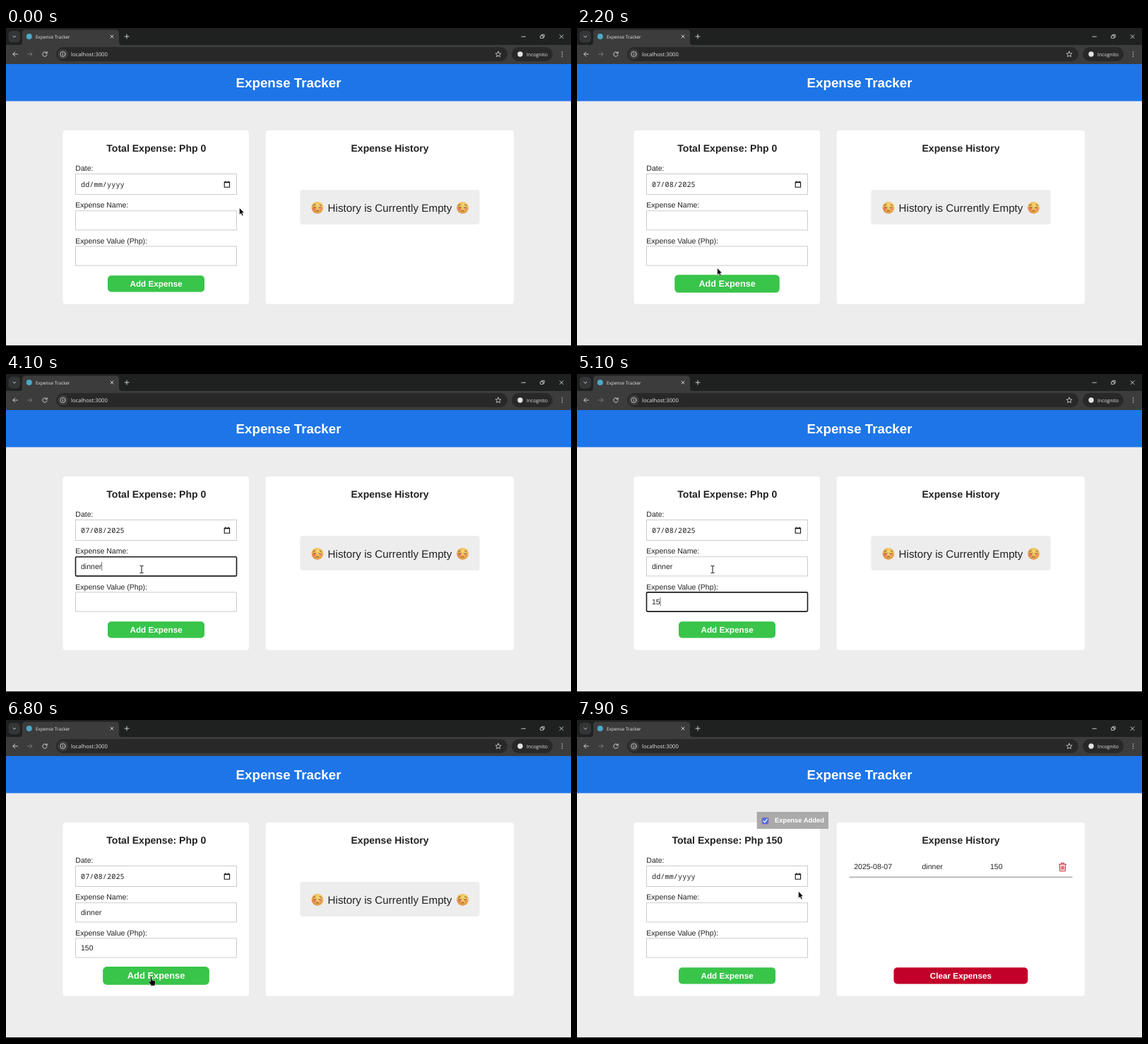
These frames come from a looping animation (800x450 px, 8000 ms). An HTML page:

```html
<!DOCTYPE html>
<html lang="en">
<head>
<meta charset="utf-8">
<title>Expense Tracker</title>
<style>
  html, body { margin: 0; width: 100%; height: 100%; overflow: hidden; background: #ededed; }
  svg { display: block; width: 800px; height: 450px; }
  text { font-family: "Liberation Sans", Arial, sans-serif; fill: #222; text-rendering: geometricPrecision; white-space: pre; }
  .mid { text-anchor: middle; }
  .bold { font-weight: 700; }
  .ui { font-family: "Open Sans", "Noto Sans", sans-serif; fill: #e6e6e6; }
  .mono { font-family: "Noto Sans Mono", monospace; letter-spacing: .1px; }
  .line { fill: none; stroke: #dedede; stroke-linecap: round; stroke-linejoin: round; }
  .white { fill: #fff; }
</style>
</head>
<body>
<svg id="stage" viewBox="0 0 800 450" xmlns="http://www.w3.org/2000/svg"></svg>
<script>
const LOOP = 8000, TICK = 100;

const rect = (x, y, w, h, fill, r = 0, more = '') =>
  `<rect x="${x}" y="${y}" width="${w}" height="${h}" rx="${r}" fill="${fill}" ${more}/>`;
const text = (x, y, size, str, cls = '', more = '') =>
  `<text x="${x}" y="${y}" font-size="${size}" class="${cls}" ${more}>${str}</text>`;
const line = (d, w = .9, more = '') => `<path class="line" d="${d}" stroke-width="${w}" ${more}/>`;
const group = (id, body) => `<g id="${id}">${body}</g>`;
const dot = (x, y, r, fill) => `<circle cx="${x}" cy="${y}" r="${r}" fill="${fill}"/>`;

const browser = () => [
  rect(0, 0, 800, 24, '#1f2020'),
  rect(3.5, 4, 16.5, 16.5, '#343536', 5),
  line('M9.8 11.2l2 2 2-2'),
  '<path d="M19 24q4 0 4-4V7q0-4.5 4.5-4.5h128q4.5 0 4.5 4.5v13q0 4 4 4z" fill="#3c3c3c"/>',
  dot(32.8, 12, 4, '#4ba9c8'),
  text(42, 14.6, 6.45, 'Expense Tracker', 'ui'),
  line('M148 10l4 4m0-4l-4 4'),
  line('M168 12h6m-3-3v6'),
  line('M730 12.2h5.4'),
  line('M757 10.8h3.6v3.6H757zM758.5 10.8V9.3h3.7V13h-1.5', .8),
  line('M784 9.6l5 5m0-5l-5 5'),
  rect(0, 24, 800, 27, '#3c3c3c'),
  rect(71, 27, 639, 20, '#282828', 10),
  rect(716, 27, 58, 20, '#282828', 10),
  line('M16.3 37h-6.4m2.9-3l-3 3 3 3'),
  line('M30.5 37h6.4m-2.9-3l3 3-3 3', .9, 'opacity=".38"'),
  line('M57.7 35.3a3.2 3.2 0 1 0 .4 2.6M58.2 33.6v2.2h-2.3'),
  dot(80.5, 37, 7.3, '#3c3c3c'),
  '<circle class="line" cx="80.5" cy="37" r="3.6" stroke-width=".8"/>',
  line('M80.5 36.8v1.8M80.5 35.3v.1', .8),
  text(92, 39.8, 7.7, 'localhost:3000', 'ui'),
  line('M697 33.2l1.1 2.5 2.8.3-2.1 1.9.6 2.7-2.4-1.4-2.4 1.4.6-2.7-2.1-1.9 2.8-.3z', .8),
  dot(728, 37, 3.7, '#e3e3e3'),
  text(737, 39.5, 6.9, 'Incognito', 'ui'),
  ...[34, 37, 40].map(y => dot(787.5, y, .75, '#dedede'))
].join('');

const face = x => `<g transform="translate(${x} 254.3)">
  <circle r="8.4" fill="url(#skin)"/>
  <ellipse cx="-4.6" cy="1.8" rx="2.6" ry="2" fill="#e8607a" opacity=".65"/>
  <ellipse cx="4.8" cy="1.8" rx="2.4" ry="1.9" fill="#e8707a" opacity=".5"/>
  <path d="M-5.5-.6q1.7 1.6 3.4 0M1.8-.6q1.7 1.6 3.4 0M-1.8 4.6q1.8-1.2 3.6 0M-5.8-3.2l2.6-1M5.5-3.2l-2.6-1"
    fill="none" stroke="#74402c" stroke-width=".9" stroke-linecap="round"/></g>`;

const field = (id, y, h) =>
  rect(98.5, y, 228, h, '#fff', 0, `id="${id}Box" stroke="#ccc" stroke-width="1"`);

const page = () => [
  rect(0, 51, 800, 52.5, '#1d75e8'),
  text(400, 83.7, 18.74, 'Expense Tracker', 'mid bold white'),
  rect(80.5, 145, 263.5, 245.7, '#fff', 4),
  rect(367.7, 145, 351.3, 245.7, '#fff', 4),
  text(212.8, 175, 14.06, '', 'mid bold', 'id="total"'),
  text(543.5, 175, 14.06, 'Expense History', 'mid bold'),
  text(98.3, 202, 10.54, 'Date:'),
  text(98.3, 254.2, 10.54, 'Expense Name:'),
  text(98.3, 304.6, 10.54, 'Expense Value (Php):'),
  field('date', 206.5, 29), field('name', 258.7, 27.2), field('value', 308.9, 27.2),
  text(106, 224.7, 10.15, '', 'mono', 'id="date"'),
  '<path d="M309.2 218h7.4v7.2h-7.4zM309.2 218.8h7.4M310.8 216.6v1.4M315 216.6v1.4" fill="none" stroke="#111" stroke-width="1.1"/>',
  text(106, 275.6, 10.54, '', '', 'id="name"'),
  text(106, 326, 10.54, '', '', 'id="value"'),
  '<path id="caret" stroke="#333" stroke-width=".7"/>',
  group('button', rect(144, 350.2, 137, 23.3, '#39c44a', 5) +
    text(212.6, 365.9, 11.71, 'Add Expense', 'mid bold white')),
  group('empty', rect(416.3, 229, 254.3, 49, '#ededed', 4) + face(441) + face(646.6) +
    text(543.5, 259.6, 15.23, 'History is Currently Empty', 'mid')),
  group('history', [
    text(392.2, 210.5, 10.54, '2025-08-07'),
    text(488.5, 210.5, 10.54, 'dinner'),
    text(585, 210.5, 10.54, '150'),
    rect(385.5, 221.8, 316, .9, '#777'),
    '<path d="M682.3 204.2h10.6M685.6 204v-1.6h4V204M683.3 204.4l.6 9.4h7.4l.6-9.4M685.8 206.3l.2 5.6M687.6 206.3v5.6M689.4 206.3l-.2 5.6" fill="none" stroke="#d01830" stroke-width="1"/>',
    rect(448.5, 350.2, 189.8, 23.3, '#c20029', 5),
    text(543.4, 365.9, 11.71, 'Clear Expenses', 'mid bold white'),
    rect(254.7, 130, 101.3, 24, '#aaa'),
    rect(261.8, 138, 9.4, 9.4, '#4c6fe0', 1.5, 'stroke="#c07aa8" stroke-width=".7"'),
    line('M264 142.8l1.9 2 3.4-4.6', 1.2, 'style="stroke:#fff"'),
    text(280, 145.4, 9.37, 'Expense Added', 'bold white')
  ].join('')),
  rect(0, 449, 800, 1, '#222')
].join('');

// Calendar grid
const COL = 16.4, ROW = 16.5, LEFT = 104.9, TOP = 278.8, SIZE = 7.03;
const cell = (i, w = 0) => [LEFT + (i % 7) * COL + w, TOP + Math.floor(i / 7) * ROW + w];
const day = i => i < 5 ? 27 + i : i < 36 ? i - 4 : i - 35;

const calendar = () => {
  const box = rect(98.5, 236.3, 127.3, 163.5, '#fff', 0, 'stroke="#bbb" stroke-width=".9"');
  const [tx, ty] = cell(11, .7);
  let out = box + text(105, 251.4, SIZE, 'August 2025', 'bold') +
    '<path d="M148.6 247.7h4.4l-2.2 2.5z" fill="#222"/>' +
    line('M192.7 254v-8.6m-3.8 3.8l3.8-3.8 3.8 3.8M211.3 245.4v8.6m-3.8-3.8l3.8 3.8 3.8-3.8', .9, 'style="stroke:#333"') +
    rect(0, 0, 15, 15, '#b4d0f5', 0, 'id="hover" stroke="#5c7696" stroke-width=".9"') +
    rect(tx, ty, 15, 15, '#1a73e8', 0, 'stroke="#1a2230" stroke-width="1.1"');
  'Su Mo Tu We Th Fr Sa'.split(' ').forEach((d, i) => out += text(113.1 + i * COL, 272.8, SIZE, d, 'mid'));
  for (let i = 0; i < 42; i++) {
    const [x, y] = cell(i), fill = i === 11 ? '#fff' : i < 5 || i > 35 ? '#808080' : '#222';
    out += text(x + COL / 2, y + 10.8, SIZE, day(i), i === 11 ? 'mid bold' : 'mid', `style="fill:${fill}"`);
  }
  return out + text(111.5, 390, SIZE, 'Clear', '', 'style="fill:#1a66d0"') +
    text(194.8, 390, SIZE, 'Today', '', 'style="fill:#1a66d0"');
};

const pointers = () =>
  '<path id="arrow" d="M0 0V9.7L2.2 7.7 3.8 11.2 5.5 10.4 3.9 7H6.8Z" fill="#000" stroke="#fff" stroke-width=".5"/>' +
  '<path id="beam" d="M-2.5-5H-.8L0-4.4.8-5H2.5M0-4.4V4.4M-2.5 5H-.8L0 4.4.8 5H2.5" fill="none" stroke="#111" stroke-width="1"/>' +
  '<path id="hand" d="M-1 .9Q0-.7 1 .9V5l4 .9q1.2.4 1.1 1.8L5.4 11.2V13H-.6V11.4L-3.4 7.8q-.6-1.5.9-1.3L-1 7.6Z" fill="#000" stroke="#fff" stroke-width=".5"/>';

const stage = document.getElementById('stage');
stage.innerHTML = `<defs><radialGradient id="skin" cx=".6" cy=".3" r=".8">
  <stop offset="0" stop-color="#f7dc78"/><stop offset=".6" stop-color="#eab04c"/><stop offset="1" stop-color="#d9803c"/>
  </radialGradient></defs>` + rect(0, 0, 800, 450, '#ededed') + browser() + page() +
  group('calendar', calendar()) + group('cursor', pointers());
const el = id => document.getElementById(id);
const show = (id, on) => el(id).setAttribute('display', on ? 'inline' : 'none');

// Each step patches the state of the form
const steps = [
  [0, { open: false, picked: false, focus: '', name: '', value: '', added: false }],
  [700, { open: true }],
  [1900, { open: false, picked: true }],
  [2700, { focus: 'name' }],
  [3400, { name: 'd' }], [3600, { name: 'di' }], [3800, { name: 'din' }],
  [3900, { name: 'dinn' }], [4000, { name: 'dinne' }], [4100, { name: 'dinner' }],
  [4400, { focus: 'value' }],
  [4900, { value: '1' }], [5100, { value: '15' }], [5300, { value: '150' }],
  [6700, { focus: '' }],
  [6900, { added: true, picked: false, name: '', value: '' }]
];

// Pointer path: time, x, y
const path = [
  [0, 330.5, 254.5], [500, 312, 222], [900, 312, 222], [1200, 209, 366],
  [1600, 203, 381], [1900, 203, 381], [2600, 192, 276.5], [6150, 192, 276.5],
  [6750, 205.5, 363], [7000, 205.5, 363], [7900, 313.6, 242.5], [LOOP, 313.6, 242.5]
];
const hovers = [[2000, 2150], [6590, 7150]];

const clamp = v => Math.min(1, Math.max(0, v));
const ease = u => u * u * (3 - 2 * u);

function pointer(t) {
  const i = path.findIndex(p => p[0] > t);
  const [t0, x0, y0] = path[i - 1], [t1, x1, y1] = path[i];
  const k = ease((t - t0) / (t1 - t0));
  return [x0 + (x1 - x0) * k, y0 + (y1 - y0) * k];
}

function shapeAt(x, y, open) {
  const within = (l, t, r, b) => x > l && x < r && y > t && y < b;
  if (open) return 'arrow';
  if (within(144, 350, 281, 374)) return 'hand';
  return within(98, 258, 327, 286) || within(98, 308, 327, 336) ? 'beam' : 'arrow';
}

function render(t) {
  const past = steps.filter(s => s[0] <= t);
  const s = Object.assign({}, ...past.map(p => p[1]));
  const last = past[past.length - 1][0];

  el('total').textContent = 'Total Expense: Php ' + (s.added ? 150 : 0);
  el('date').textContent = s.picked ? '07/08/2025' : 'dd/mm/yyyy';
  for (const id of ['name', 'value']) {
    const on = s.focus === id, box = el(id + 'Box');
    el(id).textContent = s[id];
    box.setAttribute('stroke', on ? '#1b1b1f' : '#ccc');
    box.setAttribute('stroke-width', on ? 1.6 : 1);
    box.setAttribute('rx', on ? 1.5 : 0);
  }

  const blink = s.focus && Math.floor((t - last) / 500) % 2 === 0;
  show('caret', blink);
  if (blink) {
    const x = 106.3 + (s[s.focus] ? el(s.focus).getComputedTextLength() : 0);
    el('caret').setAttribute('d', `M${x} ${s.focus === 'name' ? 266 : 316.3}v12`);
  }

  show('empty', !s.added);
  show('history', s.added);
  show('calendar', s.open);

  const grow = hovers.reduce((sum, [a, b]) => sum + ease(clamp((t - a) / 200)) - ease(clamp((t - b) / 200)), 0);
  el('button').setAttribute('transform', `translate(212.5 361.8) scale(${1 + .1 * grow}) translate(-212.5 -361.8)`);

  const [x, y] = pointer(t), shape = shapeAt(x, y, s.open);
  el('cursor').setAttribute('transform', `translate(${x} ${y})`);
  for (const id of ['arrow', 'beam', 'hand']) show(id, id === shape);

  const col = Math.floor((x - LEFT) / COL), row = Math.floor((y - TOP) / ROW);
  const over = col >= 0 && col < 7 && row >= 0 && row < 6;
  show('hover', over);
  if (over) {
    const [hx, hy] = cell(row * 7 + col, .7);
    el('hover').setAttribute('x', hx);
    el('hover').setAttribute('y', hy);
  }
}

const start = performance.now();
function frame() {
  const t = (performance.now() - start) % LOOP;
  render(Math.floor(t / TICK) * TICK);
  requestAnimationFrame(frame);
}
frame();
</script>
</body>
</html>
```
